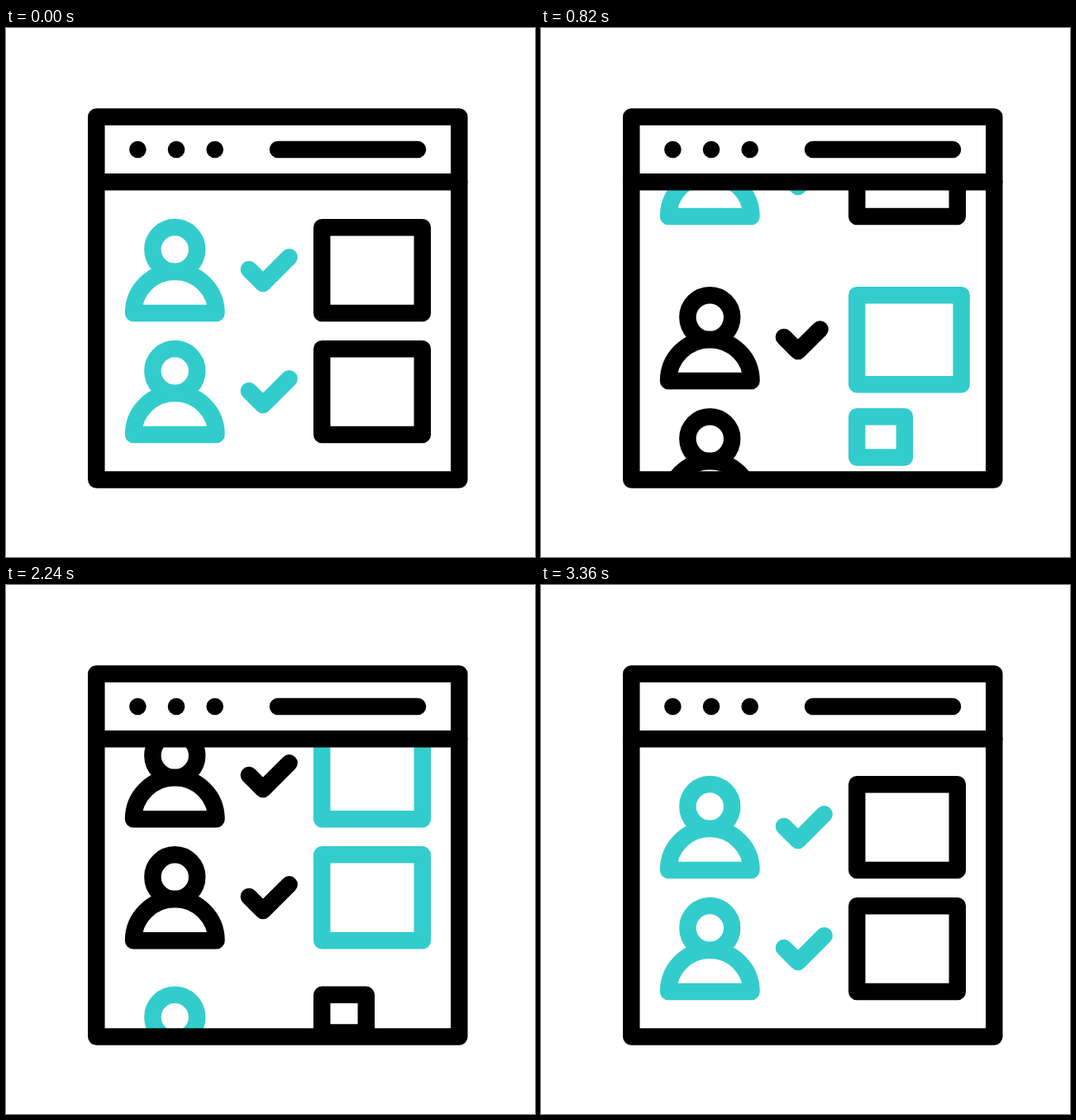
Animation of 640x640 px, one loop 3620 ms. Source, as an HTML page with a canvas:

```html
<!DOCTYPE html>
<html lang="en">
<head>
<meta charset="utf-8">
<title>Scrolling user list</title>
<style>
html, body { margin: 0; width: 100%; height: 100%; overflow: hidden; background: #fff; }
canvas { display: block; width: 640px; height: 640px; }
</style>
</head>
<body>
<canvas id="stage" width="640" height="640"></canvas>
<script>
const ctx = document.getElementById('stage').getContext('2d');
const LOOP = 3620, STEP = 20, SCROLL = 1200, ROW = 147;
const BLACK = '#000', TEAL = '#33cccc';

// Each box: start, time to peak, time to settle (ms), peak scale
const passes = [
  { start: 0, dist: 346, from: [TEAL, BLACK], to: [BLACK, TEAL],
    boxes: [[160, 472, 331, 1.1], [549, 600, 360, 1.11]] },
  { start: 1900, dist: 316.5, from: [BLACK, TEAL], to: [TEAL, BLACK],
    boxes: [[80, 600, 353, 1.1], [590, 420, 460, 1.1]] }
];
const checkStart = [500, 900], CHECK_TIME = 400;

const ease = (t, start, time) => {
  const s = Math.min(1, Math.max(0, (t - start) / time));
  return s * s * (3 - 2 * s);
};

const boxScale = (t, [start, grow, settle, peak]) =>
  peak * ease(t, start, grow) - (peak - 1) * ease(t, start + grow, settle);

function line(...pts) {
  ctx.beginPath();
  pts.forEach(([x, y]) => ctx.lineTo(x, y));
  ctx.stroke();
}

function disc(x, y, r) {
  ctx.beginPath();
  ctx.arc(x, y, r, 0, 2 * Math.PI);
  ctx.fill();
}

function person() {
  ctx.beginPath();
  ctx.arc(204.3, 268, 26.9, 0, 2 * Math.PI);
  ctx.stroke();
  ctx.beginPath();
  ctx.arc(204.3, 345, 50.2, Math.PI, 0);
  ctx.closePath();
  ctx.stroke();
}

// Tick drawn up to the share p of its length
function tick(p) {
  if (p <= 0) return;
  const a = [293.9, 291.9], short = 17, long = 31.7;
  const len = p * (short + long);
  const d = Math.min(len, short), u = Math.max(0, len - short);
  const pts = [a, [a[0] + d, a[1] + d]];
  if (u > 0) pts.push([a[0] + d + u, a[1] + d - u]);
  line(...pts);
}

function box(k) {
  if (k > 0) ctx.strokeRect(382.2, 241.2, 121.6 * k, 103.8 * k);
}

function row(y, [main, accent], tickPart, scale) {
  if (y > 330 || y < -180) return;
  ctx.save();
  ctx.translate(0, y);
  ctx.strokeStyle = main;
  person();
  tick(tickPart);
  ctx.strokeStyle = accent;
  box(scale);
  ctx.restore();
}

function browser() {
  ctx.strokeStyle = ctx.fillStyle = BLACK;
  ctx.strokeRect(109.3, 107.4, 439, 439);
  line([109.3, 186.3], [548.3, 186.3]);
  line([329, 147], [498, 147]);
  for (let i = 0; i < 3; i++) disc(159.4 + 46.65 * i, 147, 10.3);
}

function draw(time) {
  const pass = passes[time < passes[1].start ? 0 : 1];
  const t = time - pass.start;
  const shift = pass.dist * ease(t, 0, SCROLL);

  ctx.fillStyle = '#fff';
  ctx.fillRect(0, 0, 640, 640);
  ctx.lineWidth = 20.5;
  ctx.lineCap = ctx.lineJoin = 'round';

  ctx.save();
  ctx.beginPath();
  ctx.rect(109, 186, 439, 360);
  ctx.clip();
  for (let i = 0; i < 2; i++) {
    const y = i * ROW - shift;
    row(y, pass.from, 1, 1);
    row(y + pass.dist, pass.to, ease(t, checkStart[i], CHECK_TIME), boxScale(t, pass.boxes[i]));
  }
  ctx.restore();
  browser();
}

function tickFrame() {
  const now = performance.now() % LOOP;
  draw(Math.floor(now / STEP) * STEP);
  requestAnimationFrame(tickFrame);
}
tickFrame();
</script>
</body>
</html>
```
